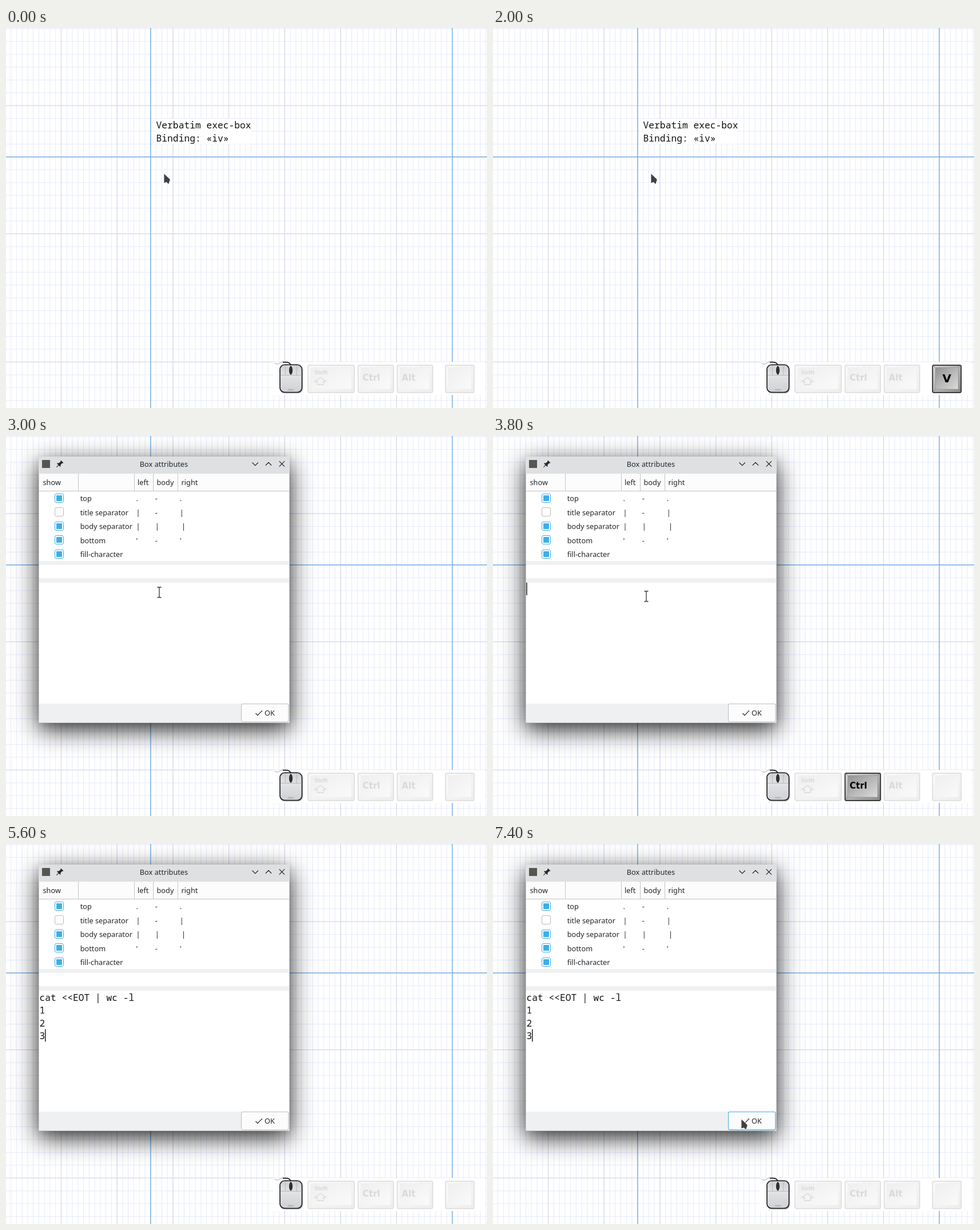
An HTML page for the animation above (8 s loop, 841x666 px).

```html
<!DOCTYPE html>
<html lang="en">
<head>
<meta charset="utf-8">
<title>Box attributes</title>
<style>
html, body { margin: 0; width: 100%; height: 100%; overflow: hidden; background: #fff; }
svg { display: block; }
#stage { position: relative; width: 841px; height: 666px; overflow: hidden; }
#stage > * { position: absolute; left: 0; top: 0; }
text { white-space: pre; }
.mono { font: 16.28px "Noto Sans Mono", monospace; fill: #111; }
.ui { font: 12.75px "Noto Sans", sans-serif; fill: #232629; }
.cap { font: bold 15px "DejaVu Sans", sans-serif; }
.off { opacity: .15; }

#shadow {
  left: 57px; top: 36px; width: 439px; height: 467px; border-radius: 4px 4px 0 0;
  box-shadow: 0 12px 44px rgba(0,0,0,.8), 0 5px 18px rgba(0,0,0,.15);
}

/* One percent is 80 ms. */
.anim { animation: 8s step-end infinite; }
#shadow, #dialog { animation-name: open; }
#click { animation-name: click; }
#lastKey { animation-name: last; }
#keyI { animation-name: keyI; }
#keyV { animation-name: keyV; }
#ctrlKey { animation-name: ctrl; }
#caretStart { animation-name: caretStart; }
#caretEnd { animation-name: caretEnd; }
#script { animation-name: pasted; }
#hover { animation-name: hover; }
#arrow { animation-name: arrow; }
#beam { animation-name: beam; }

@keyframes open { 0% { opacity: 0 } 26.25%, 100% { opacity: 1 } }
@keyframes click { 0%, 11.25%, 100% { opacity: 0 } 7.5% { opacity: 1 } }
@keyframes last { 0%, 35%, 65%, 100% { opacity: 0 } 22.5%, 57.5% { opacity: 1 } }
@keyframes keyI { 0%, 25%, 100% { opacity: 0 } 22.5% { opacity: 1 } }
@keyframes keyV { 0%, 35%, 65%, 100% { opacity: 0 } 25%, 57.5% { opacity: 1 } }
@keyframes ctrl { 0%, 70%, 100% { opacity: 0 } 47.5% { opacity: 1 } }
@keyframes caretStart { 0%, 38.75% { opacity: 1 } 35%, 57.5%, 100% { opacity: 0 } }
@keyframes caretEnd { 0%, 77.5%, 88.75% { opacity: 0 } 57.5%, 81.25%, 92.5%, 100% { opacity: 1 } }
@keyframes pasted { 0% { opacity: 0 } 57.5%, 100% { opacity: 1 } }
@keyframes hover { 0% { opacity: 0 } 80%, 100% { opacity: 1 } }
@keyframes arrow {
  0% { opacity: 1; transform: translate(276px, 255px) }
  35% { opacity: 0; transform: translate(276px, 255px) }
  80% { opacity: 1; transform: translate(414px, 470px) }
  81.25% { opacity: 1; transform: translate(419px, 474.5px) }
  82.5% { opacity: 1; transform: translate(421.5px, 476.5px) }
  83.75% { opacity: 1; transform: translate(425px, 478px) }
  85% { opacity: 1; transform: translate(428px, 479.5px) }
  86.25% { opacity: 1; transform: translate(431px, 480.5px) }
  87.5% { opacity: 1; transform: translate(433px, 481.5px) }
  88.75%, 100% { opacity: 1; transform: translate(434px, 482px) }
}
@keyframes beam {
  0%, 80%, 100% { opacity: 0 }
  35% { opacity: 1; transform: translate(268px, 271px) }
  37.5% { opacity: 1; transform: translate(268px, 274px) }
  38.75% { opacity: 1; transform: translate(268px, 278px) }
  40% { opacity: 1; transform: translate(268px, 281px) }
  57.5% { opacity: 0 }
  72.5% { opacity: 1; transform: translate(292px, 328px) }
  73.75% { opacity: 1; transform: translate(311px, 345px) }
  75% { opacity: 1; transform: translate(337px, 370px) }
  76.25% { opacity: 1; transform: translate(363px, 398px) }
  77.5% { opacity: 1; transform: translate(386px, 427px) }
  78.75% { opacity: 1; transform: translate(402px, 452px) }
}
</style>
</head>
<body>
<div id="stage">
  <svg width="841" height="666">
    <g id="grid" fill="none"></g>
    <rect x="262.6" y="159" width="166" height="44.5" fill="#fff"/>
    <g class="mono">
      <text x="262.6" y="176">Verbatim exec-box</text>
      <text x="262.6" y="198.5">Binding: «iv»</text>
    </g>
  </svg>

  <div id="shadow" class="anim"></div>

  <svg width="841" height="666">
    <defs>
      <linearGradient id="face" x2="1" y2="1">
        <stop stop-color="#929292"/><stop offset="1" stop-color="#dcdcdc"/>
      </linearGradient>
      <linearGradient id="rim" x2="1" y2="1">
        <stop stop-color="#d8d8d8"/><stop offset="1" stop-color="#8c8c8c"/>
      </linearGradient>
      <linearGradient id="shell" x2="0" y2="1">
        <stop stop-color="#cdcfd2"/><stop offset=".4" stop-color="#e2e3e5"/><stop offset="1" stop-color="#cfd1d4"/>
      </linearGradient>
    </defs>

    <g id="dialog" class="anim">
      <path d="M57 503V40a4 4 0 0 1 4-4H492a4 4 0 0 1 4 4V503Z" fill="#eff0f1"/>
      <path d="M57 66V40a4 4 0 0 1 4-4H492a4 4 0 0 1 4 4V66Z" fill="#dee0e2"/>
      <path d="M57.5 66V502.5H495.5V66" fill="none" stroke="#c9cbcd"/>
      <rect x="63" y="42" width="14" height="14" fill="#575552"/>
      <g transform="translate(94 49) rotate(45)" fill="#232629">
        <path d="M-3-6H3V-4.5H2V0L4 2V3H-4V2L-2 0V-4.5H-3Z"/><path d="M-.6 3H.6V8H-.6Z"/>
      </g>
      <text class="ui" x="276" y="53.5" text-anchor="middle">Box attributes</text>
      <path d="M430.5 46.5l5.2 5.2 5.2-5.2M453.8 51.5l5.2-5.2 5.2 5.2M477.7 44.2l9.4 9.4m0-9.4l-9.4 9.4" fill="none" stroke="#232629" stroke-width="1.2"/>

      <path d="M58 66H495V219H58ZM58 226H495V249H58ZM58 257H495V469H58Z" fill="#fff"/>
      <path d="M58 66H495V96H58Z" fill="#fcfcfc"/>
      <path d="M58 96.5H495M126.5 66V96M224.5 66V96M257.5 66V96M300.5 66V96" stroke="#c3c5c7"/>
      <g class="ui">
        <text x="64.5" y="86">show</text><text x="230" y="86">left</text>
        <text x="263.5" y="86">body</text><text x="306.5" y="86">right</text>
      </g>
      <g id="rows" class="ui"></g>

      <g id="script" class="mono anim">
        <text x="58.4" y="274.5">cat &lt;&lt;EOT | wc -l</text>
        <text x="58.4" y="297">1</text><text x="58.4" y="319.5">2</text><text x="58.4" y="342">3</text>
      </g>
      <path id="caretStart" class="anim" d="M59 257V279" stroke="#111" stroke-width="1.4"/>
      <path id="caretEnd" class="anim" d="M68.8 324.5V346.5" stroke="#111" stroke-width="1.4"/>

      <rect x="411.5" y="469.5" width="82.5" height="31.5" rx="2.5" fill="#fcfcfc" stroke="#b9bbbd"/>
      <rect id="hover" class="anim" x="411.5" y="469.5" width="82.5" height="31.5" rx="2.5" fill="none" stroke="#3daee9"/>
      <path d="M436.5 486l3.5 3.6 8-8.4" fill="none" stroke="#232629" stroke-width="1.2"/>
      <text class="ui" x="452" y="490.2">OK</text>
    </g>

    <path d="M467 585.3H837V643H467Z" fill="#fff"/>
    <g id="mouse">
      <path d="M469 587q5 4 10 0t12-2q7 1 7 8" fill="none" stroke="#aaa" stroke-width="1"/>
      <path d="M484 586q14-2 14 7" fill="none" stroke="#111" stroke-width="1.5"/>
      <rect x="480" y="591.5" width="39" height="49" rx="8" fill="#000" opacity=".25"/>
      <rect x="479" y="590.3" width="38.5" height="48.2" rx="8" fill="url(#shell)" stroke="#151515" stroke-width="1.6"/>
      <path d="M480 608.5H517M488.5 591V608M508 591V608" fill="none" stroke="#b4b6b9"/>
      <path id="click" class="anim" d="M480 608V598a8 8 0 0 1 8-8H495V608Z" fill="#3c3c3c"/>
      <path d="M498 592V608" stroke="#777"/>
      <ellipse cx="498" cy="600" rx="2.4" ry="7" fill="#333" stroke="#111"/>
      <path d="M493 634H503" stroke="#a6a8ab" stroke-width="1.6"/>
    </g>
    <g id="keys"></g>

    <g id="arrow" class="anim">
      <path d="M.4.4V16.6L4.6 15 8.2 18.4 9.6 14.6 10.8 10.6Z" fill="#3f4143" stroke="#fff" stroke-width="2" stroke-opacity=".75" paint-order="stroke" stroke-linejoin="round"/>
    </g>
    <g id="beam" class="anim" fill="none">
      <path d="M-3.5-9H-1L0-8 1-9H3.5M0-8V8M-3.5 9H-1L0 8 1 9H3.5" stroke="#333" stroke-width="1.3"/>
    </g>
  </svg>
</div>
<script>
const fill = (id, markup) => { document.getElementById(id).innerHTML = markup; };

// Character grid: every tenth line is stronger, the guides are blue.
const cellW = 9.77, cellH = 22.47;
const colX = i => (i * cellW - 1.2).toFixed(2);
const rowY = i => (i * cellH + 1.2).toFixed(2);
const range = n => [...Array(n).keys()];
const columns = list => list.map(i => `M${colX(i)} 0V666`).join("");
const lines = list => list.map(i => `M0 ${rowY(i)}H841`).join("");
const stroke = (d, color, width) => `<path d="${d}" stroke="${color}" stroke-width="${width}"/>`;
const cols = range(88), rows = range(30);
fill("grid",
  stroke(columns(cols) + lines(rows), "#e6eafd", 1) +
  stroke(columns(cols.filter(i => i % 10 === 0)) + lines(rows.filter(i => i % 10 === 6)), "#d6d8e8", 1.2) +
  stroke(columns([26, 80]) + lines([10]), "#78b0e6", 1.5));

const checkbox = (y, on) =>
  `<rect x="85.5" y="${y - 7.5}" width="15" height="15" rx="2.5" fill="#fff" stroke="${on ? "#3daee9" : "#b9bbbd"}"/>` +
  (on ? `<rect x="88" y="${y - 5}" width="10" height="10" fill="#3daee9"/>` : "");
const attributes = [
  ["top", 1, ".", "-", "."],
  ["title separator", 0, "|", "-", "|"],
  ["body separator", 1, "|", "|", " |"],
  ["bottom", 1, "'", "-", "'"],
  ["fill-character", 1, "", "", ""],
];
const cellX = [129.7, 227.5, 260.8, 303.8];
fill("rows", attributes.map(([name, on, ...chars], i) => {
  const y = 109 + 24.4 * i;
  return checkbox(Math.round(y), on) +
    [name, ...chars].map((s, c) => `<text x="${cellX[c]}" y="${y + 5.3}">${s}</text>`).join("");
}).join(""));

const key = (x, w, legend = "") =>
  `<rect x="${x + 1}" y="591" width="${w}" height="48" rx="2" fill="url(#rim)" stroke="#111" stroke-width="1.5"/>
   <path d="M${x + 1} 591l5 4M${x + w + 1} 591l-5 4M${x + 1} 639l5-6M${x + w + 1} 639l-5-6" stroke="#777"/>
   <rect x="${x + 6}" y="595" width="${w - 10}" height="38" rx="1.5" fill="url(#face)" stroke="#999" stroke-width=".8"/>${legend}`;
const label = (x, y, s, extra = "") => `<text class="cap" x="${x}" y="${y}" ${extra}>${s}</text>`;
const faded = markup => `<g class="off">${markup}</g>`;
const letter = s => label(793.5, 620.5, s, `id="key${s}" text-anchor="middle" style="font-size:20px"`)
  .replace('class="cap"', 'class="cap anim"');
const ctrl = key(614.5, 62, label(623.5, 618, "Ctrl"));
const shift = label(539, 607, "Shift", 'style="font-size:8.7px"') +
  '<path d="M540 619.5l9.7-7 9.7 7H555V625H544.5V619.5Z" fill="none" stroke="#000" stroke-width="1.3"/>';
fill("keys",
  faded(key(527, 81, shift)) +
  faded(ctrl) +
  faded(key(683, 62, label(692, 618, "Alt"))) +
  faded(key(767.5, 50)) +
  `<g id="ctrlKey" class="anim">${ctrl}</g>` +
  `<g id="lastKey" class="anim">${key(767.5, 50, letter("I") + letter("V"))}</g>`);
</script>
</body>
</html>
```
